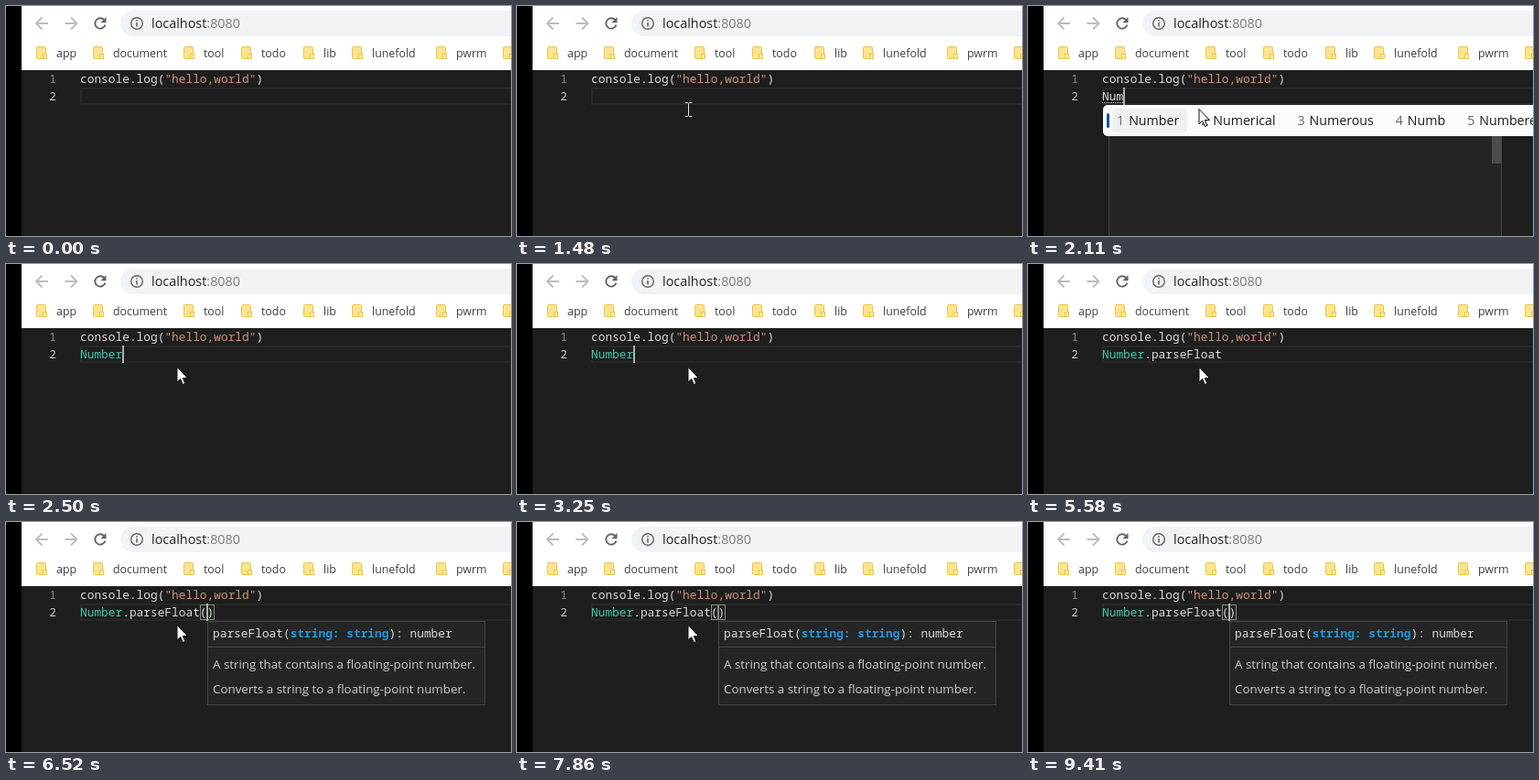
An HTML page that plays this animation: 552 px wide and 251 px high, repeating every 9.72 s.

```html
<!DOCTYPE html>
<html lang="en">
<head>
<meta charset="utf-8">
<title>Code completion</title>
<style>
  html, body { margin: 0; width: 100%; height: 100%; overflow: hidden; background: #000; }
  svg { display: block; width: 552px; height: 251px; }
  text { font-family: "Open Sans", "Noto Sans", sans-serif; }
  .code { font: 12.83px "Noto Sans Mono", "Liberation Mono", monospace; fill: #dcdcdc; white-space: pre; }
  .mark { font-size: 12.4px; fill: #3c4043; }
  .doc { font-size: 13.35px; fill: #ccc; }
  .ime { font-size: 14.2px; fill: #1b1b1b; }
  .ime .num { fill: #666; }
  .type { fill: #3dc9b0; }
  .string { fill: #ce9178; }
  .param { fill: #2196e0; font-weight: bold; }
  .panel { fill: #252526; stroke: #454545; }
  .nav { fill: none; stroke-width: 1.8; }
  .crisp { shape-rendering: crispEdges; }
</style>
</head>
<body>
<svg viewBox="0 0 552 251">
  <rect width="552" height="251" fill="#000"/>
  <rect x="17" width="535" height="70" fill="#fff"/>
  <rect x="125" y="5" width="460" height="28" rx="14" fill="#f1f3f4"/>
  <path class="nav" stroke="#babcbe" d="M46 19H33M39.5 12.5 33 19l6.5 6.5M64.500 19H77.500M71 12.500 77.500 19 71 25.500"/>
  <path class="nav" stroke="#5f6368" d="M107.300 15.200A5.700 5.700 0 1 0 108.500 20.500"/>
  <path fill="#5f6368" d="M109.500 12v6.200h-6.200z"/>
  <circle class="nav" cx="143" cy="19" r="6.300" stroke="#5f6368" style="stroke-width:1.4"/>
  <path d="M143 15.200v1.600M143 18v4.500" stroke="#5f6368" stroke-width="1.600"/>
  <text x="159" y="24" font-size="14.4" fill="#202124">localhost<tspan fill="#777b80">:8080</tspan></text>
  <g id="bookmarks"></g>

  <rect x="17" y="70" width="535" height="181" fill="#1e1e1e"/>
  <rect class="crisp" x="82" y="90" width="480" height="17" fill="none" stroke="#282828" stroke-width="2"/>
  <text class="code" x="47.300" y="84" style="fill:#858585">1</text>
  <text class="code" x="47.300" y="103" style="fill:#c6c6c6">2</text>
  <text class="code" x="81" y="84">console.log(<tspan class="string">"hello,world"</tspan>)</text>
  <g id="scene"></g>
  <rect id="caret" class="crisp" y="89" width="2" height="19" fill="#aeafad"/>
  <g id="pointer">
    <path id="beam" class="crisp" fill="none" stroke="#e8e8e8" d="M-3.500-7.500h3M.5-7.500h3M0-7V7M-3.500 7.500h3M.5 7.500h3"/>
    <path id="arrow" fill="#fff" stroke="#111" d="M-.5-.5V16l3.700-3.500 2.600 6 2.600-1.100-2.600-5.900h5.200z"/>
  </g>
</svg>
<script>
const LOOP = 9720, LEFT = 81, CHAR = 7.697;
const $ = id => document.getElementById(id);
const column = n => LEFT + n * CHAR;

const folder = x => `<g stroke="#eac54f"><rect x="${x + .5}" y="44.500" width="10" height="13" rx="1" fill="#ffe48f"/>
  <rect x="${x + 7.5}" y="52.500" width="4" height="5" fill="#ffe9a8"/></g>`;
const bookmarks = [[33, 'app'], [95, 'document'], [194, 'tool'], [257, 'todo'],
  [325, 'lib'], [378, 'lunefold'], [470, 'pwrm'], [543, '']];
$('bookmarks').innerHTML = bookmarks.map(([x, label]) =>
  folder(x) + `<text class="mark" x="${x + 22}" y="56">${label}</text>`).join('');

const panel = (x, y, w, h) =>
  `<rect class="panel crisp" x="${x + .5}" y="${y + .5}" width="${w - 1}" height="${h - 1}"/>`;

function suggestions({ col, rows, size = rows.length, icon = '#b180d7', typed = 0, scroll }) {
  const x = Math.floor(column(col));
  const list = rows.map((name, i) => {
    const y = 109 + i * 19;
    return (i ? '' : `<rect x="${x + 1}" y="${y}" width="428" height="19" fill="#062f4a"/>`) +
      `<path d="M${x + 11} ${y + 4}l5 2.500v6l-5 2.500-5-2.500v-6z" fill="none" stroke="${icon}"/>
       <text class="code" x="${x + 23}" y="${y + 14}"><tspan fill="#0097fb">${name.slice(0, typed)}</tspan>${name.slice(typed)}</text>`;
  });
  const bar = scroll ? `<rect x="${x + 419}" y="109" width="10" height="63" fill="#4b4b4c"/>` : '';
  return panel(x, 108, 430, size * 19 + 2) + list.join('') + bar;
}

function candidates(words) {
  const items = words.map((word, i) =>
    `<tspan class="num" dx="${i ? 24 : 0}">${i + 1}</tspan><tspan dx="5">${word}</tspan>`);
  return `<rect x="82" y="108" width="500" height="34" rx="5" fill="#fbfbfb"/>
    <rect x="92" y="112" width="82" height="26" rx="4" fill="#f0f0f0"/>
    <rect x="86" y="117" width="3" height="16" rx="1.500" fill="#0f5499"/>
    <text class="ime" x="97" y="130">${items.join('')}</text>`;
}

const bracket = col =>
  `<rect class="crisp" x="${Math.round(column(col)) + .5}" y="90.500" width="7" height="16" fill="#1d251d" stroke="#888"/>`;

const hint = panel(220, 108, 304, 92) +
  `<path class="crisp" d="M221 136.500h302" stroke="#454545"/>
   <text class="code" x="226" y="126">parseFloat(<tspan class="param">string: string</tspan>): number</text>
   <text class="doc" x="226" y="160">A string that contains a floating-point number.</text>
   <text class="doc" x="226" y="187">Converts a string to a floating-point number.</text>`;

const loading = suggestions({ col: 1, rows: [], size: 12, scroll: true });
const classes = ['BeforeUnloadEvent', 'BiquadFilterNode', 'ByteLengthQueuingStrategy'];
const members = ['apply', 'arguments', 'bind', 'call', 'caller', 'EPSILON', 'isFinite', 'isInteger', 'isNaN'];
const parsers = ['parseFloat', 'parseInt'];
const wordsNu = candidates(['Number', 'Numbers', 'Nuclear', 'Numerous', 'Nurse']);
const wordsNum = candidates(['Number', 'Numerical', 'Numerous', 'Numb', 'Numbered']);

// start time, text on line 2, popups, caret column when not at the end
const steps = [
  [0, '', ''],
  [1810, 'N', candidates(['Not', 'Now', 'New', 'Never', 'Need', 'Number'])],
  [1885, 'N', loading + candidates(['Not', 'Now', 'New', 'Never', 'Need', 'Number'])],
  [1960, 'Nu', loading + wordsNu],
  [2110, 'Num', loading + wordsNum],
  [2500, 'Number', ''],
  [2880, 'Number', suggestions({ col: 3, rows: [], size: 3 })],
  [2960, 'Number', suggestions({ col: 3, rows: classes, icon: '#75beff' })],
  [3250, 'Number', ''],
  [4050, 'Number.', suggestions({ col: 7, rows: members, scroll: true })],
  [4430, 'Number.p', suggestions({ col: 7, rows: [...parsers, 'prototype'], typed: 1 })],
  [4510, 'Number.pa', suggestions({ col: 7, rows: parsers, typed: 2 })],
  [5040, 'Number.parseFloat', suggestions({ col: 7, rows: parsers, typed: 2 })],
  [5120, 'Number.parseFloat', ''],
  [6360, 'Number.parseFloat(', '', 18],
  [6440, 'Number.parseFloat()', '', 18],
  [6520, 'Number.parseFloat()', hint, 18],
];
const blinks = [980, 1480, 1810, 2960, 3250, 3730, 4050, 5580, 6130, 6920, 7380, 7860, 8410, 8950, 9410];

function line(text) {
  const composing = text && text.length < 6;
  const colored = text.replace('Number', '<tspan class="type">Number</tspan>');
  const underline = composing
    ? `<path class="crisp" d="M81 105.500H${column(text.length)}" stroke="#d4d4d4" stroke-dasharray="1 1"/>` : '';
  const boxes = text.endsWith(')') ? bracket(17) + bracket(18) : '';
  return boxes + `<text class="code" x="81" y="103">${colored}</text>` + underline;
}

const smooth = p => p * p * (3 - 2 * p);
const stepped = (t, start, end, count) =>
  Math.max(0, Math.min(count, Math.floor((t - start) / (end - start) * (count - 1) + 1.001)));

function drawPointer(t) {
  const rest = [187.5, 113];
  const leaving = stepped(t, 8790, 9100, 5);
  const [from, to, p] = t < 8790
    ? [[539.5, 226], rest, stepped(t, 220, 1160, 13) / 13]
    : [rest, [537.5, 243], leaving / 4];
  const e = smooth(Math.min(1, p));
  const x = Math.round(from[0] + (to[0] - from[0]) * e - .5) + .5;
  const y = Math.round(from[1] + (to[1] - from[1]) * e);
  const overHint = x > 220 && x < 524 && y < 200;
  const isArrow = t >= 1810 && (!leaving || overHint);
  $('pointer').style.display = t < 70 || leaving === 5 ? 'none' : '';
  $('pointer').setAttribute('transform', `translate(${x} ${y})`);
  $('arrow').style.display = isArrow ? '' : 'none';
  $('beam').style.display = isArrow ? 'none' : '';
}

let shown = -1;
function draw(t) {
  const index = steps.filter(([start]) => start <= t).length - 1;
  if (index !== shown) {
    const [, text, popups, col = text.length] = steps[index];
    $('scene').innerHTML = line(text) + popups;
    $('caret').setAttribute('x', Math.floor(column(col)));
    shown = index;
  }
  const on = blinks.filter(b => b <= t).length % 2;
  $('caret').style.display = on ? '' : 'none';
  drawPointer(t);
}

const origin = performance.now();
function tick() {
  draw((performance.now() - origin) % LOOP);
  requestAnimationFrame(tick);
}
tick();
</script>
</body>
</html>
```
